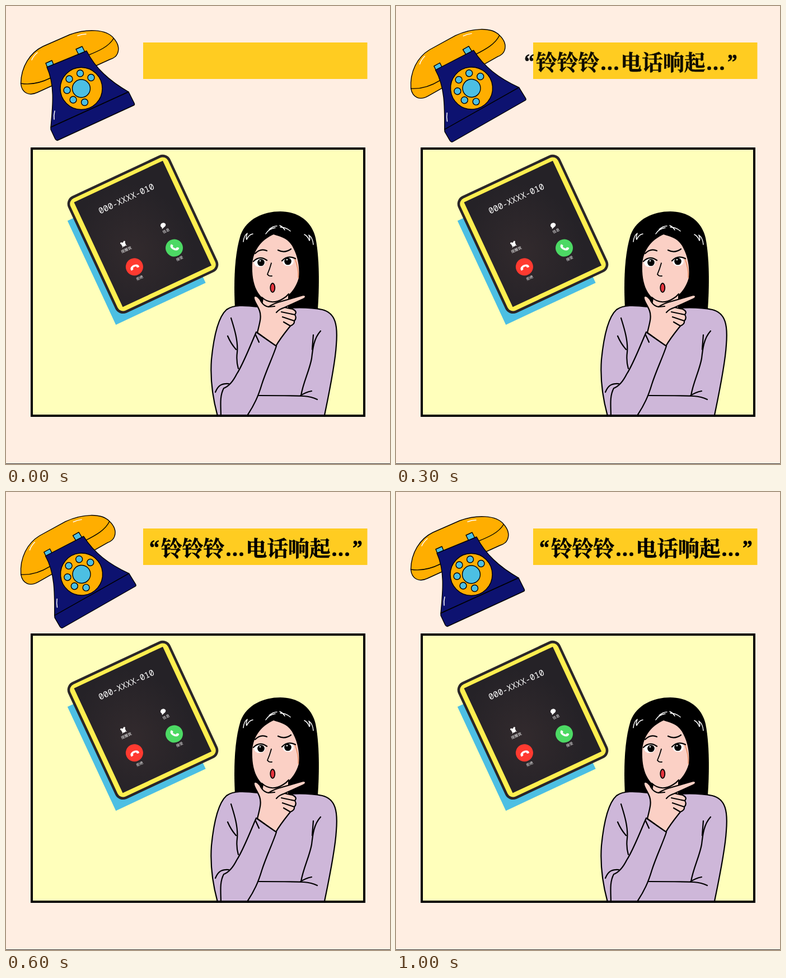
An HTML page for the animation above (1.9 s loop, 686x816 px).

```html
<!DOCTYPE html>
<html lang="zh-CN">
<head>
<meta charset="utf-8">
<style>
  html, body { margin: 0; width: 100%; height: 100%; overflow: hidden; background: #ffeee2; }
  svg { display: block; width: 686px; height: 816px; }
  .ink { stroke: #000; stroke-linecap: round; stroke-linejoin: round; }
  .line { fill: none; }
  .navy { fill: #0d1270; }
  .amber { fill: #ffae00; }
  .sky { fill: #4cbfe3; }
  .skin { fill: #fbd0c5; }
  .lilac { fill: #ceb7d9; }
  .shine { fill: none; stroke: #fff; stroke-width: 1.5; stroke-linecap: round; }
  #title { font: 900 37.8px "Noto Serif", "Noto Serif CJK SC", "Noto Serif SC", "Noto Sans CJK SC", serif; stroke: #000; stroke-width: .6; }
  .label { font: 6.5px "Noto Sans CJK SC", sans-serif; fill: #fff; text-anchor: middle; }
  .number { font: 300 15px "Noto Sans Mono", monospace; fill: #fff; text-anchor: middle; }
</style>
</head>
<body>
<svg viewBox="0 0 686 816">
  <defs>
    <radialGradient id="screen" cx=".35" cy=".6" r=".6">
      <stop offset="0" stop-color="#322a2d"/>
      <stop offset="1" stop-color="#252227"/>
    </radialGradient>
    <clipPath id="panel"><path d="M48 256H638V728H48Z"/></clipPath>
    <path id="handset" d="M-8 3.5C-9 -1-5-3.5 0-3.5S9-1 8 3.5Q7 4.5 3.8 3.2Q3 2.5 3.2.4Q0-.6-3.2.4Q-3 2.5-3.8 3.2Q-7 4.5-8 3.5Z" fill="#fff"/>
  </defs>

  <rect y="815" width="686" height="1" fill="#333"/>
  <rect x="245" y="65" width="400.5" height="65" fill="#ffcc21"/>

  <g id="phone" class="ink" stroke-width="1.4">
    <path class="amber" d="M26.5 138C27 108 43 83 66 72L114 51C144 40 179 41 192 57C200 66 203 76 199 85Q196 92 186 95L56 154C41 161 28 155 26.500 138Z"/>
    <path class="line" d="M26.5 138C45 141 62 137 80 128M146 88C166 80 184 72 192 58"/>
    <path class="sky" d="M71 102L82 97L86 107L75 112ZM125 77L136 72L141 82L130 87Z"/>
    <path class="navy" d="M73 109L144 80C160 111 184 133 219 153L80 216C84 174 87 140 73 109Z"/>
    <path class="navy" d="M80 216L219 153L229 173Q230.500 176 228 177L93 239Q90 240.500 88 237L80 220Z"/>
    <circle class="amber" cx="134.5" cy="147" r="37.5"/>
    <circle class="sky" cx="134.5" cy="147" r="16"/>
    <g id="holes" class="sky"></g>
    <path class="shine" d="M46 96Q49 89 56 83M128 53Q135 50 143 50M87 187Q85 195 86 202"/>
  </g>

  <g id="title">
    <text x="277" y="114">铃铃铃</text>
    <text x="428.5" y="114">电话响起</text>
    <g text-anchor="middle">
      <text x="265" y="114">“</text>
      <text x="409" y="114">…</text>
      <text x="598" y="114">…</text>
      <text x="628" y="114">”</text>
    </g>
  </g>

  <rect x="46" y="254" width="594" height="476" fill="#ffffbb" stroke="#000" stroke-width="4"/>

  <g transform="translate(244.3 406) rotate(-25)">
    <rect class="sky" x="-112" y="-78" width="177" height="204.5"/>
    <rect x="-98.5" y="-112" width="197" height="225" rx="13" fill="#ffef50" stroke="#2a2628" stroke-width="4.6"/>
    <rect x="-87.5" y="-103" width="175" height="206" fill="url(#screen)"/>
    <text class="number" y="-64">000-XXXX-010</text>
    <g fill="#fff">
      <circle cx="-39" cy="2.5" r="3.8"/>
      <circle cx="-42" cy="-1" r="1.8"/>
      <circle cx="-36" cy="-1" r="1.8"/>
      <path d="M-41.5 4L-43 7M-36.5 4L-35 7" stroke="#fff"/>
      <ellipse cx="39.5" cy="1.3" rx="4.8" ry="4"/>
      <path d="M36 3L35 7L40 5Z"/>
    </g>
    <text class="label" x="-38.5" y="15.5">提醒我</text>
    <text class="label" x="40" y="15">信息</text>
    <circle cx="-38.3" cy="47" r="15.5" fill="#ff3a30"/>
    <circle cx="40.4" cy="46.5" r="15.5" fill="#4cd964"/>
    <use href="#handset" x="-38.3" y="47"/>
    <use href="#handset" transform="translate(40.4 46.5) rotate(-130)"/>
    <text class="label" x="-38" y="71">拒绝</text>
    <text class="label" x="41" y="70">接受</text>
  </g>

  <g class="ink" stroke-width="2.2" clip-path="url(#panel)">
    <path stroke="none" d="M409 538C407 499 407 447 419 408C430 379 460 366 490 366C523 366 546 384 553 413C560 448 560 498 557 540Z"/>
    <path class="skin" stroke="none" d="M461 515L504 508V550H455Z"/>
    <path class="skin" stroke="none" d="M478 407C458 416 442 433 440 460C439 486 444 506 457 519C469 530 483 529 494 522C510 514 519 499 523 484C525 461 520 443 511 427C502 413 490 411 478 407Z"/>
    <path class="line" d="M457 519C469 530 483 529 494 522Q500 519 505 513"/>
    <path class="line" d="M516 450Q523 468 522 484" stroke="#e4804c" stroke-width="1.2"/>

    <path class="lilac" d="M450 536C426 533 406 532 394 541C377 556 370 600 367 630C364 672 371 706 379 734H568C575 700 588 640 590 604C593 569 589 547 565 541C546 537 522 537 504 538Q477 552 450 536Z"/>
    <path class="line" d="M402 556C407 572 415 596 413 617Q411 632 415 646M396 588Q402 602 411 612M562 579C550 592 548 610 546 628C542 650 531 670 527 694M549 586L547 612M546 686Q535 688 525 695"/>
    <path class="lilac" d="M452 694Q504 694 532 695Q546 696 556 701"/>
    <path class="skin" d="M449 582C453 565 457 554 453 543C449 532 441 524 443 518C446 514 453 520 456 527Q461 535 469 536Q480 529 493 526L531 515C537 515 536 520 531 522L498 537L512 540Q521 544 516 550Q520 556 515 561Q516 567 508 570C500 580 490 592 482 606Z"/>
    <path class="line" d="M469 536L480 535M498 537Q488 540 483 546M516 550L492 545M515 561L494 554M508 570L496 563"/>
    <path class="lilac" d="M447 581C438 601 424 638 412 656Q402 676 389 681C381 696 384 713 384 734H428C444 711 451 694 457 674C465 649 476 627 483 606Q464 593 447 581Z"/>
    <path class="line" d="M374 688C379 676 385 672 398 673M446 586L452 599"/>

    <g stroke="none">
      <ellipse cx="453" cy="457" rx="10" ry="8" fill="#fff"/>
      <ellipse cx="504" cy="455" rx="10" ry="8" fill="#fff"/>
      <circle cx="455.5" cy="457" r="6.3"/>
      <circle cx="503.5" cy="455" r="6.3"/>
      <circle cx="454" cy="454" r="1.3" fill="#fff"/>
      <circle cx="502" cy="452" r="1.3" fill="#fff"/>
    </g>
    <path class="line" d="M442 455Q453 444 466 453M493 454Q503 443 517 450M445 441Q455 431 466 436M486 435Q498 441 509 433"/>
    <path class="line" d="M474 458Q471 469 467 478Q470 482 475 481" stroke-width="1.8"/>
    <ellipse cx="476.3" cy="502" rx="4" ry="8" fill="#e5343d" stroke-width="1.8"/>
    <path class="shine" d="M424 420Q425 409 431 405Q428 413 430 416Q434 407 441 406M549 425Q548 413 541 408Q544 416 542 418Q539 410 533 407M464 406Q469 397 481 395M470 398Q477 392 484 392M489 391Q494 393 498 399M490 394Q500 394 508 401"/>
  </g>
</svg>
<script>
  const LOOP = 1900, STEP = 100;
  const tilts = [0, -5, 6.7, -5, 6, 0, -5, 6.7, -2, -2];  // degrees, rests afterwards
  const slide = [711, 237, 79, 27, 6];                    // title distance left of rest
  const phone = document.getElementById('phone');
  const title = document.getElementById('title');

  document.getElementById('holes').innerHTML =
    [[113, 130], [132.5, 120], [152, 127.5], [109, 150], [120, 167], [140.5, 171.5]]
      .map(([x, y]) => `<circle cx="${x}" cy="${y}" r="6"/>`).join('');

  function draw(time) {
    const step = Math.floor(time % LOOP / STEP);
    const offset = slide[step] || 0;
    phone.setAttribute('transform', `rotate(${tilts[step] || 0} 129 141)`);
    title.setAttribute('transform', `translate(${-offset})`);
    title.setAttribute('opacity', Math.max(0, 1 - offset / 400));
  }

  const start = performance.now();
  function tick() {
    draw(performance.now() - start);
    requestAnimationFrame(tick);
  }
  tick();
</script>
</body>
</html>
```
